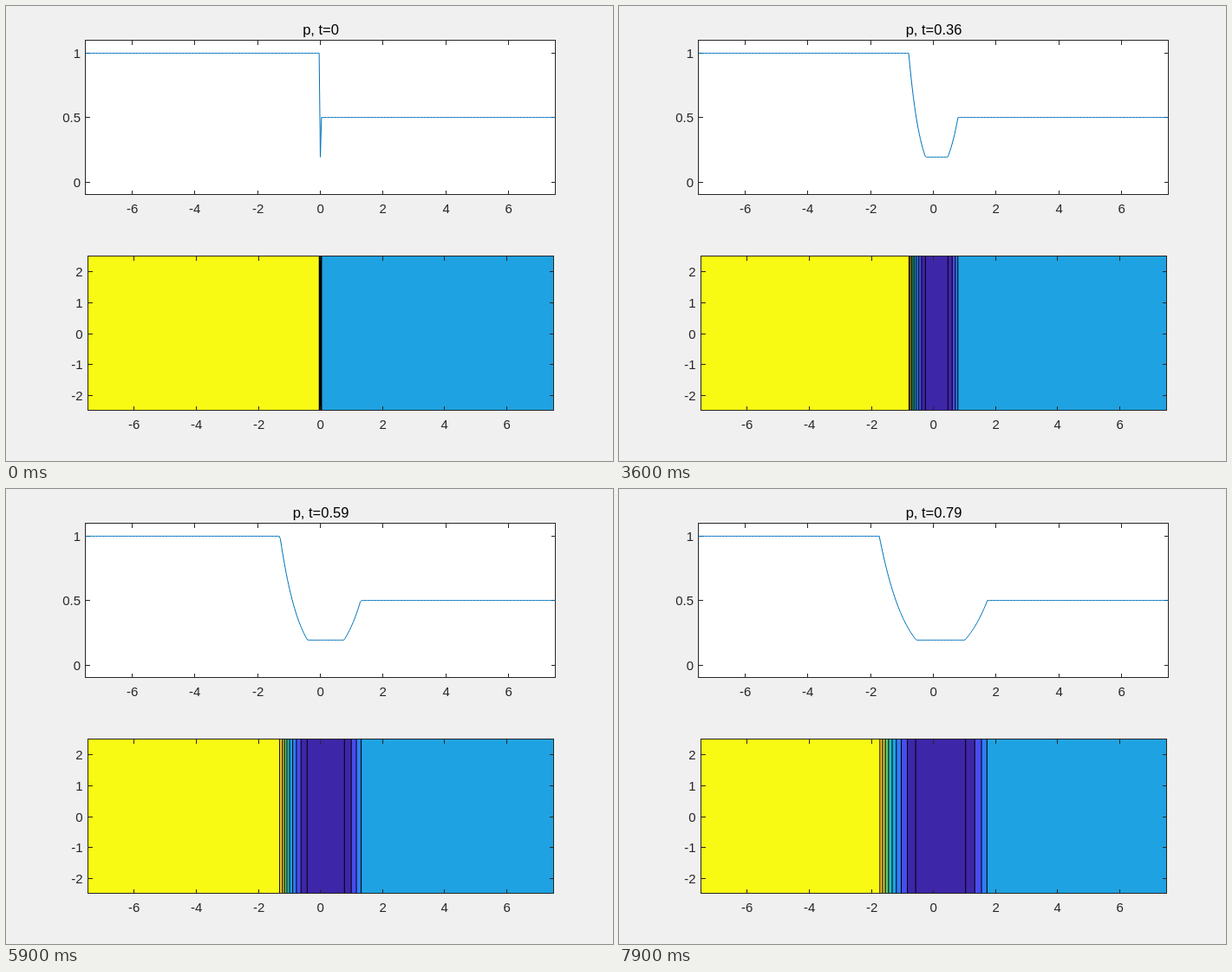
Recreate the animation shown at these times as an HTML page. Size 700 by 525 pixels, loop 8 s.

```html
<!DOCTYPE html>
<html lang="en">
<head>
<meta charset="utf-8">
<title>Pressure of two rarefaction waves</title>
<style>
  html, body { margin: 0; width: 100%; height: 100%; overflow: hidden; background: #f0f0f0; }
  svg { display: block; width: 700px; height: 525px; }
  text { font: 15px "Liberation Sans", Arial, sans-serif; fill: #262626; text-anchor: middle; }
  .y { text-anchor: end; }
  #title { font-size: 16.5px; fill: #000; }
  .axes { fill: none; stroke: #262626; shape-rendering: crispEdges; }
  #curve { fill: none; stroke: #0072bd; stroke-linejoin: round; }
  #lines { fill: none; stroke: #000; }
</style>
</head>
<body>
<svg id="stage" viewBox="0 0 700 525">
  <rect width="700" height="525" fill="#f0f0f0"/>
  <rect x="91.5" y="39.5" width="542" height="178" fill="#fff"/>
  <g id="bands"></g>
  <path id="lines"/>
  <g id="frames"></g>
  <path id="curve"/>
  <text id="title" x="363" y="33"></text>
</svg>
<script>
const $ = id => document.getElementById(id);

function add(parent, name, attrs, text = '') {
  const el = document.createElementNS('http://www.w3.org/2000/svg', name);
  for (const key in attrs) el.setAttribute(key, attrs[key]);
  el.textContent = text;
  parent.append(el);
  return el;
}

const plot = {
  left: 91.5, right: 633.5, top: 39.5, bottom: 217.5,
  x: v => 362.5 + v * 542 / 15,
  y: v => 202.67 - v * 148.33,
  yTicks: [0, 0.5, 1], labelX: 86
};
const map = {
  left: 94.5, right: 631.5, top: 288.5, bottom: 466.5,
  x: v => 362.6 + v * 35.8,
  y: v => 377.7 - v * 35.8,
  yTicks: [-2, -1, 0, 1, 2], labelX: 88.5
};

function drawAxes(a) {
  const g = $('frames');
  let d = `M${a.left} ${a.top}H${a.right}V${a.bottom}H${a.left}Z`;
  for (let v = -6; v <= 6; v += 2) {
    const x = Math.floor(a.x(v)) + 0.5;
    d += `M${x} ${a.top}v5M${x} ${a.bottom}v-5`;
    add(g, 'text', { x: x + 0.2, y: a.bottom + 21.5 }, v);
  }
  for (const v of a.yTicks) {
    const y = Math.round(a.y(v) - 0.1) + 0.5;
    d += `M${a.left} ${y}h5M${a.right} ${y}h-5`;
    add(g, 'text', { x: a.labelX, y: y + 5.5, class: 'y' }, v);
  }
  add(g, 'path', { d, class: 'axes' });
}
drawAxes(plot);
drawAxes(map);

// Riemann problem: gas with gamma 1.4 pulled apart at unit speed
const PL = 1, PR = 0.5, C = Math.sqrt(1.4);
const root = (2 - 2 / (5 * C)) / (1 + (PL / PR) ** (1 / 7));
const MID = root ** 7;
const uMid = -1 + 5 * C * (1 - root);
const tailL = uMid - C * root;
const tailR = uMid + C * (MID / PR) ** (1 / 7);
const head = 1 + C;
const fan = s => ((5 * C - 1 + s) / (6 * C)) ** 7;

function pressure(x, t) {
  if (x <= -head * t && x < 0) return PL;
  if (x >= head * t && x > 0) return PR;
  if (x < tailL * t) return PL * fan(-x / t);
  if (x > tailR * t) return PR * fan(x / t);
  return MID;
}

const HALF = 200, DX = 7.5 / HALF;
const grid = Array.from({ length: 2 * HALF + 1 }, (_, i) => (i - HALF) * DX);

const colors = ['62,38,168', '72,76,238', '46,124,248', '31,162,225', '37,190,186',
  '95,203,115', '203,192,45', '254,202,52', '249,250,20'];
const box = { y: map.top, height: map.bottom - map.top };
const bands = $('bands');
add(bands, 'rect', { ...box, x: map.left, width: map.right - map.left, fill: `rgb(${colors[0]})` });
const levels = colors.map((c, i) => {
  const band = x => add(bands, 'rect', { ...box, x, width: 0, fill: `rgb(${c})` });
  return { value: (i + 2) / 10, west: band(map.left), east: i < 4 ? band(map.right) : null };
});

// Where the sampled pressure crosses a level, walking inward from one end
function crossing(p, level, from, dir) {
  let i = from;
  while (p[i + dir] >= level) i += dir;
  const share = (p[i] - level) / (p[i] - p[i + dir]);
  return map.x(grid[i] + dir * share * DX);
}

function draw(step) {
  const t = step / 100;
  const p = grid.map(x => pressure(x, t));
  $('title').textContent = 'p, t=' + t;
  $('curve').setAttribute('d', 'M' + grid.map((x, i) =>
    plot.x(x).toFixed(2) + ' ' + (plot.y(p[i]) + 0.1).toFixed(2)).join('L'));
  let d = '';
  const line = x => { d += `M${x} ${map.top}V${map.bottom}`; };
  for (const { value, west, east } of levels) {
    const a = crossing(p, value, 0, 1);
    west.setAttribute('width', a - map.left);
    line(a);
    if (east) {
      const b = crossing(p, value, 2 * HALF, -1);
      east.setAttribute('x', b);
      east.setAttribute('width', map.right - b);
      line(b);
    }
  }
  $('lines').setAttribute('d', d);
}

const start = performance.now();
let shown = -1;
function tick() {
  const step = Math.floor((performance.now() - start) / 100) % 80;
  if (step !== shown) draw(shown = step);
  requestAnimationFrame(tick);
}
tick();
</script>
</body>
</html>
```
